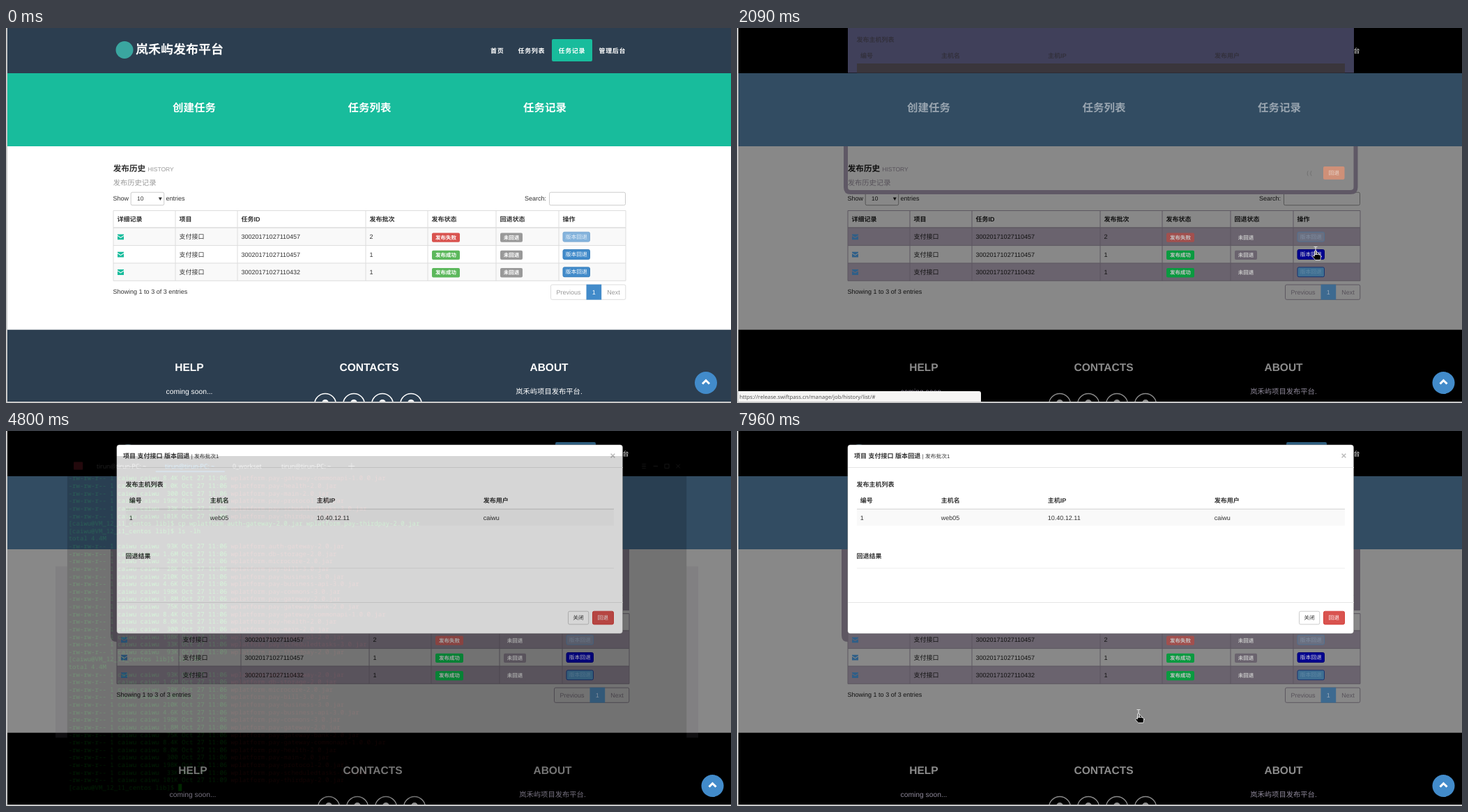
Recreate the animation shown at these times as an HTML page. Size 1040x539 px, loop 8000 ms.

```html
<!DOCTYPE html>
<html lang="zh-CN">
<head>
<meta charset="utf-8">
<title>发布平台</title>
<style>
html, body { margin: 0; width: 100%; height: 100%; overflow: hidden; background: #fff; }
svg { display: block; width: 1040px; height: 539px; }
text { font-family: "Liberation Sans", "Noto Sans CJK SC", sans-serif; text-rendering: geometricPrecision; white-space: pre; }
.mono text { font-family: "Noto Sans Mono", monospace; }
.ui, .ui text { font-family: "Noto Sans", sans-serif; }
#dim, #ghost, #trace, #modal, #status, #term, #mouse, #mouse g, #hover { animation: 8s linear infinite; }
#dim { animation-name: dim; }
#ghost { animation-name: ghost; animation-timing-function: step-end; }
#trace { animation-name: trace; animation-timing-function: step-end; }
#modal { animation-name: modal; }
#status { animation-name: status; animation-timing-function: step-end; }
#status text { fill: #555; }
#hover { animation-name: hover; animation-timing-function: step-end; }
#term { animation-name: term; transform-origin: 532px 539px; }
#mouse { animation-name: mouse; }
#mouse g { animation-timing-function: step-end; }
#arrow { animation-name: arrow; }
#hand { animation-name: hand; }
#beam { animation-name: beam; }
@keyframes dim { 0%, 23.6% { opacity: 0 } 25.4%, 100% { opacity: 1 } }
@keyframes ghost { 0% { opacity: 0 } 25.6% { opacity: 1 } 26.9%, 100% { opacity: 0 } }
@keyframes trace { 0% { opacity: 0 } 28%, 100% { opacity: 1 } }
@keyframes modal {
  0%, 26.6% { opacity: 0; transform: translateY(-58px); animation-timing-function: ease-out }
  29.5%, 100% { opacity: 1; transform: none }
}
@keyframes status {
  0% { opacity: 0; fill: #5b6899 } 19.3% { opacity: .9; fill: #5b6899 }
  20.4% { opacity: 1; fill: #f6f5f4 } 34%, 100% { opacity: 0 }
}
@keyframes hover { 0% { fill: #428bca } 19.2%, 100% { fill: #3069b0 } }
@keyframes term {
  0%, 59.7% { opacity: 0; transform: scale(.92) }
  61.6%, 93.9% { opacity: 1; transform: none }
  96.2%, 100% { opacity: 0; transform: scale(.92) }
}
@keyframes arrow { 0% { opacity: 1 } 19.2% { opacity: 0 } 25.7% { opacity: 1 } 60% { opacity: 0 } 93.1%, 100% { opacity: 1 } }
@keyframes hand { 0% { opacity: 0 } 19.2% { opacity: 1 } 25.7%, 100% { opacity: 0 } }
@keyframes beam { 0% { opacity: 0 } 60% { opacity: 1 } 93.1%, 100% { opacity: 0 } }
@keyframes mouse {
  0%, 11.6% { transform: translate(630px, 560px) }
  11.8% { transform: translate(640px, 534px) }
  19.2%, 21% { transform: translate(832px, 319px) }
  25.6%, 26.3% { transform: translate(830px, 320px) }
  30.9%, 31.2% { transform: translate(594px, 280px) }
  32.9% { transform: translate(418px, 215px) }
  34.5% { transform: translate(385px, 150px) }
  36.7%, 39.1% { transform: translate(417px, 127px) }
  40.6% { transform: translate(425px, 120px) }
  45% { transform: translate(558px, 462px) }
  49.1% { transform: translate(481px, 162px) }
  52.2% { transform: translate(568px, 539px) }
  52.6%, 60% { transform: translate(560px, 560px) }
  61.2% { transform: translate(520px, 392px) }
  61.9% { transform: translate(517px, 374px) }
  62.5%, 64.4% { transform: translate(514px, 356px) }
  70% { transform: translate(188px, 514px) }
  73.5%, 76.1% { transform: translate(204px, 501px) }
  77.4%, 80.7% { transform: translate(220px, 502px) }
  82% { transform: translate(208px, 496px) }
  85.6% { transform: translate(301px, 500px) }
  88.1% { transform: translate(250px, 509px) }
  90.3% { transform: translate(285px, 505px) }
  93.1% { transform: translate(520px, 550px) }
  96.9% { transform: translate(560px, 550px) }
  99.4%, 100% { transform: translate(576px, 406px) }
}
</style>
</head>
<body>
<svg id="stage" viewBox="0 0 1040 539"></svg>
<script>
const BASE = 9.03, SMALL = 7.74;

// Text is placed by its vertical middle.
const text = (x, y, s, fill, size = BASE, bold = 0, anchor = 'start', extra = '') =>
  `<text x="${x}" y="${y + size * .36}" font-size="${size}" fill="${fill}" text-anchor="${anchor}"${bold ? ' font-weight="700"' : ''} ${extra}>${s}</text>`;
const mid = (x, y, s, fill, size, bold) => text(x, y, s, fill, size, bold, 'middle');
const box = (x, y, w, h, fill, line = 'none', r = 0, extra = '') =>
  `<rect x="${x}" y="${y}" width="${w}" height="${h}" fill="${fill}" stroke="${line}" rx="${r}" ${extra}/>`;
const path = (d, fill, line = 'none', width = 1) =>
  `<path d="${d}" fill="${fill}" stroke="${line}" stroke-width="${width}"/>`;

const BRAND = '岚禾屿';

const light = {
  nav: '#2c3e50', navText: '#fff', logo: '#3aa6a0', tab: '#18bc9c', band: '#18bc9c', bandText: '#fff',
  bg: '#fff', ink: '#333', soft: '#999', field: '#fff', fieldLine: '#ccc', line: '#ddd', stripe: '#f9f9f9',
  mail: '#18bc9c', fail: '#d9534f', ok: '#5cb85c', badge: '#999', badgeText: '#fff',
  btn: ['#84b3dc', '#428bca', '#428bca'], btnLine: ['#7dabd4', '#357ebd', '#357ebd'],
  btnText: ['#e8f1f9', '#fff', '#fff'], page: '#428bca', pageText: '#fff',
  foot: '#2c3e50', footHead: '#fff', footText: '#fff', ring: '#fff'
};
const dark = {
  nav: '#000', navText: '#aaa', logo: '#456a78', tab: '#2e5f80', band: '#324c62', bandText: '#99a5b0',
  bg: '#888', ink: '#111', soft: '#57525a', field: '#888', fieldLine: '#555', line: '#5c5760', stripe: '#6a636e',
  mail: '#2f5f88', fail: '#a2504e', ok: '#0a9a40', badge: '#6a636e', badgeText: '#c4c4c4',
  btn: ['#6a6f80', '#000090', '#3f6f92'], btnLine: ['#52708f', '#000070', '#17336f'],
  btnText: ['#7f8da0', '#ddd', '#5f87a3'], page: '#3d6a90', pageText: '#9ab',
  foot: '#000', footHead: '#8c8c8c', footText: '#8d8798', ring: '#8c8c8c'
};

const cols = [154, 243, 332, 516, 605, 703, 793, 889];
const rows = [['30020171027110457', 2], ['30020171027110457', 1], ['30020171027110432', 1]];

function tableRow(c, [id, batch], i, lit) {
  const y = 300 + i * 25.3, failed = batch === 2;
  return (i % 2 ? '' : box(154, y - 12.7, 735, 25.3, c.stripe)) +
    path(`M160 ${y - 3.5}h9v1.2l-4.5 3l-4.5-3zM160 ${y - 1}l4.5 3l4.5-3v5.3h-9z`, c.mail) +
    text(248.5, y, '支付接口', c.ink) + text(337.5, y, id, c.ink) + text(521.5, y, batch, c.ink) +
    box(611, y - 5.5, 40, 13.3, failed ? c.fail : c.ok, 'none', 2) +
    mid(631, y + .9, failed ? '发布失败' : '发布成功', c.badgeText, 7.5, 1) +
    box(709, y - 5.5, 32, 13.3, c.badge, 'none', 2) + mid(725, y + .9, '未回退', c.badgeText, 7.5, 1) +
    box(799, y - 6.7, 38.5, 13.8, c.btn[i], c.btnLine[i], 2, lit && i === 1 ? 'id="hover"' : '') +
    mid(818.2, y, '版本回退', c.btnText[i], SMALL);
}

function page(c, dx, topX) {
  const lit = c === light;
  const links = [[695, '首页'], [734.5, '任务列表'], [792.5, '任务记录'], [850.5, '管理后台']];
  const heads = ['详细记录', '项目', '任务ID', '发布批次', '发布状态', '回退状态', '操作'];
  const grid = cols.map(x => `M${x} 262.5V363.3`).join('') +
    [262.5, 312.6, 338, 363.3].map(y => `M154 ${y}H889`).join('');
  const rings = [458, 499, 540, 581].map(x =>
    `<circle cx="${x}" cy="541" r="15.5" fill="none" stroke="${c.ring}" stroke-width="1.4"/>` +
    `<circle cx="${x}" cy="539" r="5" fill="${c.ring}"/>`).join('');
  return box(0, 0, 1040, 539, c.bg) + box(0, 0, 1040, 65, c.nav) + box(0, 65, 1040, 105, c.band) +
    box(0, 433.7, 1040, 106, c.foot) +
    `<g transform="translate(${dx})">` +
    `<circle cx="170" cy="31.5" r="12.5" fill="${c.logo}"/>` +
    text(186, 31, BRAND + '发布平台', c.navText, 18, 1) +
    box(783, 16, 58, 32, c.tab, 'none', 2) +
    links.map(([x, s]) => text(x, 32.5, s, c.navText, BASE, 1, 'start', 'letter-spacing=".65"')).join('') +
    ['创建任务', '任务列表', '任务记录'].map((s, i) => mid(270 + i * 251.5, 114, s, c.bandText, 15.5, 1)).join('') +
    text(153.7, 202, '发布历史', c.ink, 11.6, 1) + text(203.3, 203, 'HISTORY', c.soft, 8.5) +
    text(153.7, 222, '发布历史记录', c.soft, 10.3) +
    text(153.5, 245, 'Show', c.ink) + box(179.2, 236.2, 47.5, 18.5, c.field, c.fieldLine, 2) +
    text(188, 245.3, '10', c.ink, 8.4) + path('M218.8 243.5h5l-2.5 4.5z', c.ink) +
    text(229.5, 245, 'entries', c.ink) + text(744, 245, 'Search:', c.ink) +
    box(779.5, 236.2, 109, 18.5, c.field, c.fieldLine, 2) +
    rows.map((r, i) => tableRow(c, r, i, lit)).join('') +
    path(grid, 'none', c.line) + path('M154 287H889', 'none', c.line, 1.6) +
    heads.map((s, i) => text(cols[i] + 5.5, 274.5, s, c.ink, BASE, 1)).join('') +
    text(153.5, 379, 'Showing 1 to 3 of 3 entries', c.ink) +
    box(781.5, 369, 107.3, 21.3, c.field, c.line, 2) + box(832.5, 368.6, 21.7, 22, c.page) +
    mid(807, 379.8, 'Previous', c.soft) + mid(843.3, 379.8, '1', c.pageText) + mid(871.5, 379.8, 'Next', c.soft) +
    ['HELP', 'CONTACTS', 'ABOUT'].map((s, i) => mid(263 + i * 258, 487, s, c.footHead, 15.5, 1)).join('') +
    mid(263, 521.8, 'coming soon...', c.footText, 10.3) + mid(779, 521.8, BRAND + '项目发布平台.', c.footText, 10.3) +
    rings + '</g>' +
    `<circle cx="${topX}" cy="510" r="16" fill="#428bca"/>` +
    path(`M${topX - 5} 511.5l5-5l5 5`, 'none', '#fff', 3);
}

const hostCols = [177, 293, 446, 685];
const hostHeads = ['编号', '主机名', '主机IP', '发布用户'];

function modal() {
  const ink = '#333', rule = (x, y, w, col, h = 1) => box(x, y, w, h, col);
  return box(158.7, 19.7, 726, 271.5, '#fff', 'rgba(0,0,0,.25)', 4) +
    text(168, 36, '项目 支付接口 版本回退', ink, BASE, 1) + text(265.8, 36.5, '| 发布批次1', ink, SMALL) +
    mid(870.5, 35.5, '×', '#bbb', 13.5, 1) + rule(159, 52, 726, '#e5e5e5') +
    text(171.5, 77, '发布主机列表', ink, BASE, 1) +
    hostHeads.map((s, i) => text(hostCols[i] - .3, 100, s, ink, BASE, 1)).join('') +
    rule(172, 111.6, 700, '#ddd', 1.4) + box(172, 113, 700, 23, '#f9f9f9') +
    ['1', 'web05', '10.40.12.11', 'caiwu'].map((s, i) => text(hostCols[i] - .3, 124.8, s, ink)).join('') +
    text(171.5, 179.8, '回退结果', ink, BASE, 1) + rule(172, 196.7, 700, '#eee') + rule(159, 246, 726, '#e5e5e5') +
    box(806.5, 259.2, 29.3, 18.7, '#fff', '#ccc', 2) + mid(821, 268.5, '关闭', ink, SMALL) +
    box(841.5, 259.2, 30, 18.7, '#d9534f', '#d43f3a', 2) + mid(856.3, 268.5, '回退', '#fff', SMALL);
}

function ghost() {
  const shade = '#33313d';
  return '<g style="mix-blend-mode:lighten">' + box(159, 0, 726, 64.5, '#40405a') +
    box(172, 51, 700, 13.5, '#3a363c') + text(171.5, 17, '发布主机列表', shade, BASE, 1) +
    hostHeads.map((s, i) => text(hostCols[i], 40, s, shade, BASE, 1)).join('') + '</g>' +
    path('M156 170V229Q156 236 163 236H880Q887.5 236 887.5 229V170', 'none', '#5f5865', 6) +
    mid(821, 208, '( (', '#666', SMALL) + box(841, 199, 30.5, 18.7, '#cf9078', 'none', 2) +
    mid(856.3, 208.3, '回退', '#e8d6cc', SMALL);
}

const jars = [
  ['auth-gateway-2.0', '93K'], ['db-storage-2.0', '1.6M'], ['microcore-2.0', '28K'], ['pay-bill-3.0', '28K'],
  ['pay-business-3.0', '210K'], ['pay-business-api-3.0', '4.6K'], ['pay-commons-3.0', '198K'],
  ['pay-gateway-2.0', '1.8M'], ['pay-gateway-bank-2.0', '75K'], ['pay-gateway-commonapi-1.0.0', '8.4K'],
  ['pay-health-2.0', '8.0K'], ['pay-main-2.0', '300'], ['pay-protocol-2.0', '198K'],
  ['pay-scheduledtasks-3.0', '33K'], ['pay-thirdpay-2.0', '101K']
];

function listing(size, time) {
  return jars.map(([name, kb], i) => {
    const last = i === jars.length - 1;
    return `-rw-rw-r-- 1 caiwu caiwu ${(last ? size : kb).padStart(4)} Oct 27 11:${last ? time : '06'} ` +
      `<tspan fill="#7d1c1c">wplatform.${name}.jar</tspan>`;
  });
}

function terminal() {
  const prompt = '[caiwu@VM_12_11_centos lib]$ ', ls = [prompt + 'ls -lh', 'total 4.4M'];
  const lines = [
    ...listing('101K', '06').slice(9),
    prompt + 'cp wplatform.auth-gateway-2.0.jar wplatform.pay-thirdpay-2.0.jar',
    ...ls, ...listing('93K', '09'), ...ls, ...listing('101K', '09'), prompt
  ];
  const tab = 'tirun@tirun-PC: ~', grey = '#c8c8c8';
  return box(38, 170, 18, 263.7, '#5e5762') + box(1008, 170, 18, 263.7, '#5e5762') +
    box(56, 0, 952, 527, '#000') + box(66, 9, 14, 12, '#d8394f', 'none', 1) +
    '<g class="ui">' + text(101, 16, tab, grey, 9.45) + text(206, 16, tab, '#2ca7f8', 9.45) +
    text(310, 16, '0_workset', grey, 9.45) + text(385, 16, tab, grey, 9.45) + '</g>' +
    box(192, 23, 106, 1.5, '#1a74b8') +
    path('M488 15.5h10M493 10.5v10M939.5 12.5h6M939.5 15.5h6M939.5 18.5h6M957 15.5h7M974.5 12.5h6.5v6h-6.5zM992 12.5l6 6M998 12.5l-6 6', 'none', '#999', .9) +
    '<g class="mono">' + lines.map((s, i) => text(58, 34 + i * 11.62, s, '#00c81e', 9.68)).join('') + '</g>' +
    box(226.6, 505, 5.6, 11, '#00f000');
}

const statusBar = '<path d="M2 522H347Q350 522 350 525V537H2Z"/><g class="ui">' +
  text(3.5, 529.8, 'https://release.swiftpass.cn/manage/job/history/list/#', '#555', 7.72) + '</g>';

const mouse =
  `<g id="arrow">${path('M0 0V11.5L2.7 9.2L4.5 13L6.5 12L4.7 8.5H8.5Z', '#000', '#fff', .8)}</g>` +
  `<g id="hand">${path('M-1.5 .5Q0 -1 1.5 .5V5L6.5 6.2Q8 7 7.6 9L6.8 13.5H-.3L-4.5 8.8Q-4 6.5 -1.5 8Z', '#000', '#fff', .8)}</g>` +
  `<g id="beam">${path('M-2.5 -5.5H2.5M0 -5.5V5.5M-2.5 5.5H2.5', 'none', '#ddd', 1.2)}</g>`;

const layer = (id, body) => `<g id="${id}">${body}</g>`;

document.getElementById('stage').innerHTML =
  page(light, 0, 1004) +
  layer('dim', page(dark, 5, 1013.5)) +
  layer('ghost', ghost()) +
  layer('trace', path('M150 170H159V303Q150 303 150 294ZM885 170H894V258H885Z', '#5e5762')) +
  layer('modal', modal()) +
  layer('status', statusBar) +
  layer('term', terminal()) +
  layer('mouse', mouse) +
  box(0, 0, 2, 539, '#c8c8c8') + box(0, 537, 1040, 2, '#c8c8c8');
</script>
</body>
</html>
```
